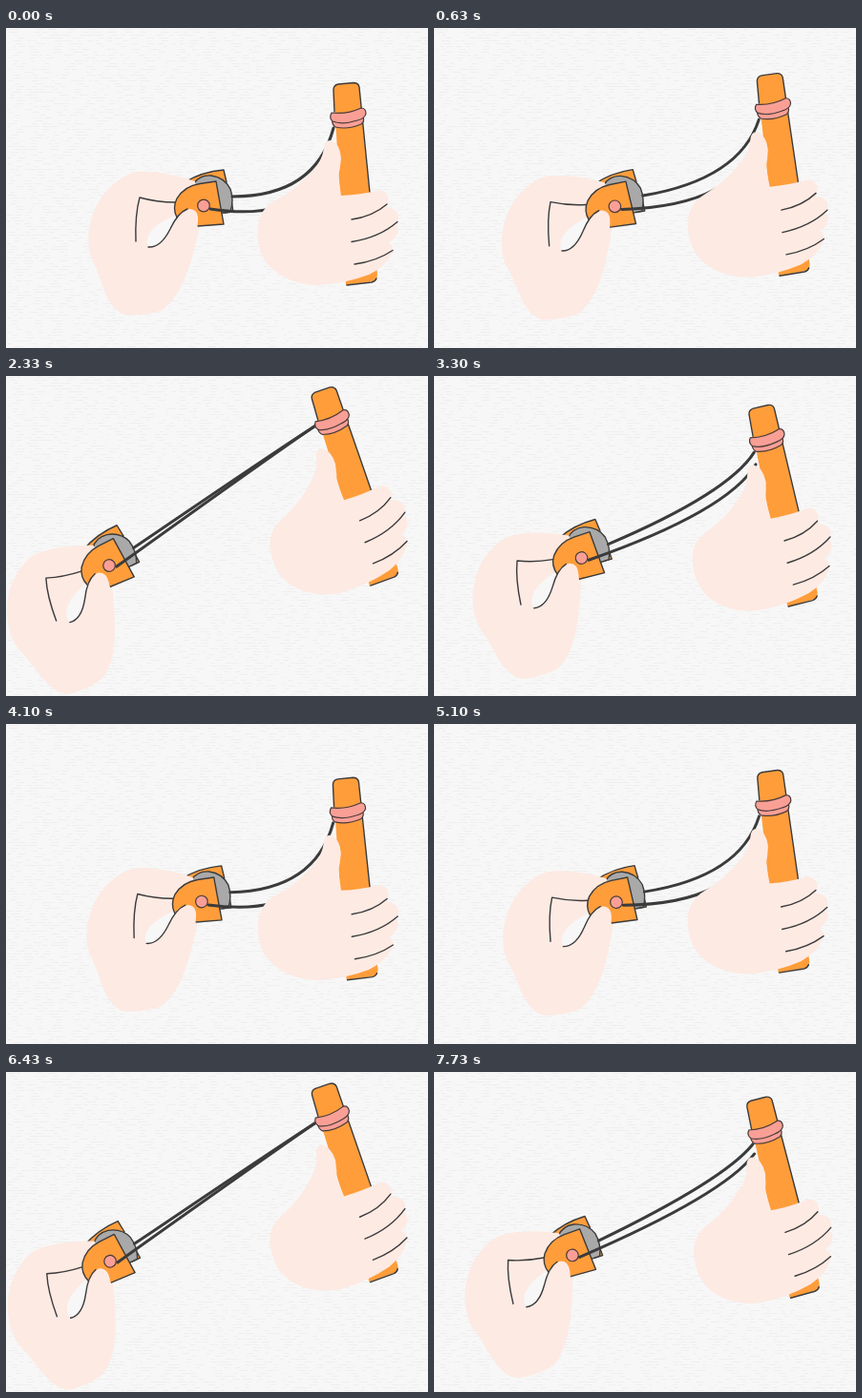
These frames come from a looping animation (442 px wide and 336 px high, 7810 ms). An HTML page:

```html
<!DOCTYPE html>
<html>
<head>
<meta charset="utf-8">
<style>
  html, body { margin: 0; width: 100%; height: 100%; overflow: hidden; background: #f7f7f7; }
  svg { display: block; width: 442px; height: 336px; }
  path, circle { fill: none; stroke-linecap: round; stroke-linejoin: round; }
  .skin { fill: #fdeae3; }
  .wood { fill: #ff9d3a; }
  .wheel { fill: #a9a9a9; }
  .paper { fill: #f7f7f7; }
  .line { stroke: #3b3b3b; stroke-width: 1.4; }
  .pink { fill: #fa9f96; stroke: #4a3b3a; stroke-width: 1.2; }
  .string { stroke: #3b3b3b; stroke-width: 3; }
  #weave { stroke: #efefef; stroke-linecap: butt; }
</style>
</head>
<body>
<svg viewBox="0 0 442 336">
  <path id="weave"/>

  <g id="left">
    <path class="wood" d="M187 162 Q205 151 228 149 L238 193 L215 196Z"/>
    <path class="line" d="M187 162 Q205 151 228 149 L231 162 M236 181 L238 193 L229 194"/>
    <path class="wheel line" d="M196 164 Q203 154 215 155 Q229 157 235 169 Q239 181 235 193 L215 196Z"/>
    <path class="skin" d="M136 151 Q160 148 198 161 L204 200 Q201 222 192 250 Q182 282 164 296 Q150 302 126 301.500 Q110 298 101 270 Q97 257 89 240 Q84 224 88 206 Q93 184 107 169 Q122 154 136 151Z"/>
    <path class="paper" d="M184 194 Q161 202 152 213 Q145 223 149 230 Q162 231 172 211 Q178 199 184 194Z"/>
    <path class="wood line" d="M179 199 Q174 189 179 179 Q187 166 203 163.500 L220 161 L228 206 L201 208"/>
    <circle class="pink" cx="207" cy="186.500" r="6.300"/>
    <path class="skin" d="M150 231 Q163 229 173 209 Q181 191 193 190 Q202 191 201 203 Q199 226 190 250 L160 246Z"/>
    <path class="line" d="M177 183 Q158 183 140 178 Q135 196 136 224 M149 230 Q162 231 172 211 Q180 194 190 190"/>
  </g>

  <g id="stick">
    <path class="wood" d="M348 59 L364 57.500 Q369 57.500 370 62 L389 259 Q389 264 385 266 L356 270 L343 65 Q343 60 348 59Z"/>
    <path class="line" d="M344 88 L343 65 Q343 60 348 59 L364 57.500 Q369 57.500 370 62 L381 173 M388 263 Q387 266 383 267 L357 270"/>
  </g>
  <path id="upper" class="string"/>
  <path id="lower" class="string"/>
  <g id="right">
    <path class="pink" d="M342 96 Q357 101 374 93 Q376 98 372 101 Q358 107 345 104 Q341 101 342 96Z"/>
    <path class="pink" d="M341 89 Q357 91 372 84 Q377 84 377 90 Q376 95 368 97 Q352 102 342 98 Q338 94 341 89Z"/>
    <path class="skin" d="M341 118 Q350 122 351 137 Q350 148 348 156 L351 176 Q372 175 388 171 Q397 169 400 177 Q402 184 398 188 Q410 189 411 198 Q411 203 408 206 Q413 212 408 219 Q405 223 401 225 Q408 231 404 237 Q397 251 380 259 Q354 269 325 270 Q296 269 277 251 Q261 234 264 207 Q266 190 282 181 Q305 169 321 150 Q331 140 333 126 Q334 117 341 118Z"/>
    <path class="line" d="M362 201 Q384 198 399 185 M362 224.500 Q391 220 410 203.500 M365 248 Q388 245 405 233.500"/>
  </g>
</svg>
<script>
const LOOP = 7810, PULL = 2240, CYCLE = 4490;
const el = id => document.getElementById(id);
const lerp = (a, b, t) => a + (b - a) * t;

// Faint woven paper made of seeded dashes
let seed = 7, weave = '';
const random = () => (seed = seed * 16807 % 2147483647) / 2147483647;
for (let y = 1.5; y < 336; y += 3)
  for (let x = random() * 12; x < 442; x += 5 + random() * 22)
    weave += `M${x.toFixed(1)} ${y}h${(2 + random() * 8).toFixed(1)}`;
el('weave').setAttribute('d', weave);

// Cubic Bezier easing with control points (x1, 0) and (x2, 1)
function ease(x, x1, x2) {
  let lo = 0, hi = 1;
  for (let i = 0; i < 24; i++) {
    const s = (lo + hi) / 2, r = 1 - s;
    if (3 * s * r * r * x1 + 3 * s * s * r * x2 + s * s * s < x) lo = s; else hi = s;
  }
  return lo * lo * (3 - 2 * lo);
}

function tension(ms) {
  const t = ms % CYCLE;
  return t < PULL ? ease(t / PULL, .535, .2)
                  : 1 - ease((t - PULL) / (CYCLE - PULL), .71, .235);
}

const transform = o => `translate(${o.dx} ${o.dy}) rotate(${o.angle} ${o.cx} ${o.cy})`;

function place(o, x, y) {
  const a = o.angle * Math.PI / 180, c = Math.cos(a), s = Math.sin(a);
  x -= o.cx; y -= o.cy;
  return [o.cx + o.dx + x * c - y * s, o.cy + o.dy + x * s + y * c];
}

function drawString(id, from, control, to) {
  el(id).setAttribute('d', `M${from}Q${control} ${to}`);
}

function draw(ms) {
  const p = tension(ms), q = p + .16 * p * (1 - p);
  const left = { cx: 207, cy: 186.5, dx: -99 * p, dy: 12.5 * p ** 1.6, angle: -18.5 * p };
  const right = { cx: 340, cy: 200, dx: 9 * q, dy: -44 * q, angle: -13.5 * q };
  el('left').setAttribute('transform', transform(left));
  for (const id of ['stick', 'right']) el(id).setAttribute('transform', transform(right));

  // The slack strings hang below the ring and rise to it as they tighten
  const bend = lerp(324, 288, p ** 1.3);
  drawString('upper', place(left, 237, 177), [bend, lerp(177, 75, p)],
    place(right, 343, lerp(105, 92, p ** 6)));
  drawString('lower', place(left, 214, 190), [bend, lerp(207, 76, p ** 1.1)],
    place(right, 343, lerp(122, 92, p ** 3)));
}

function tick() {
  draw(performance.now() % LOOP);
  requestAnimationFrame(tick);
}
tick();
</script>
</body>
</html>
```
